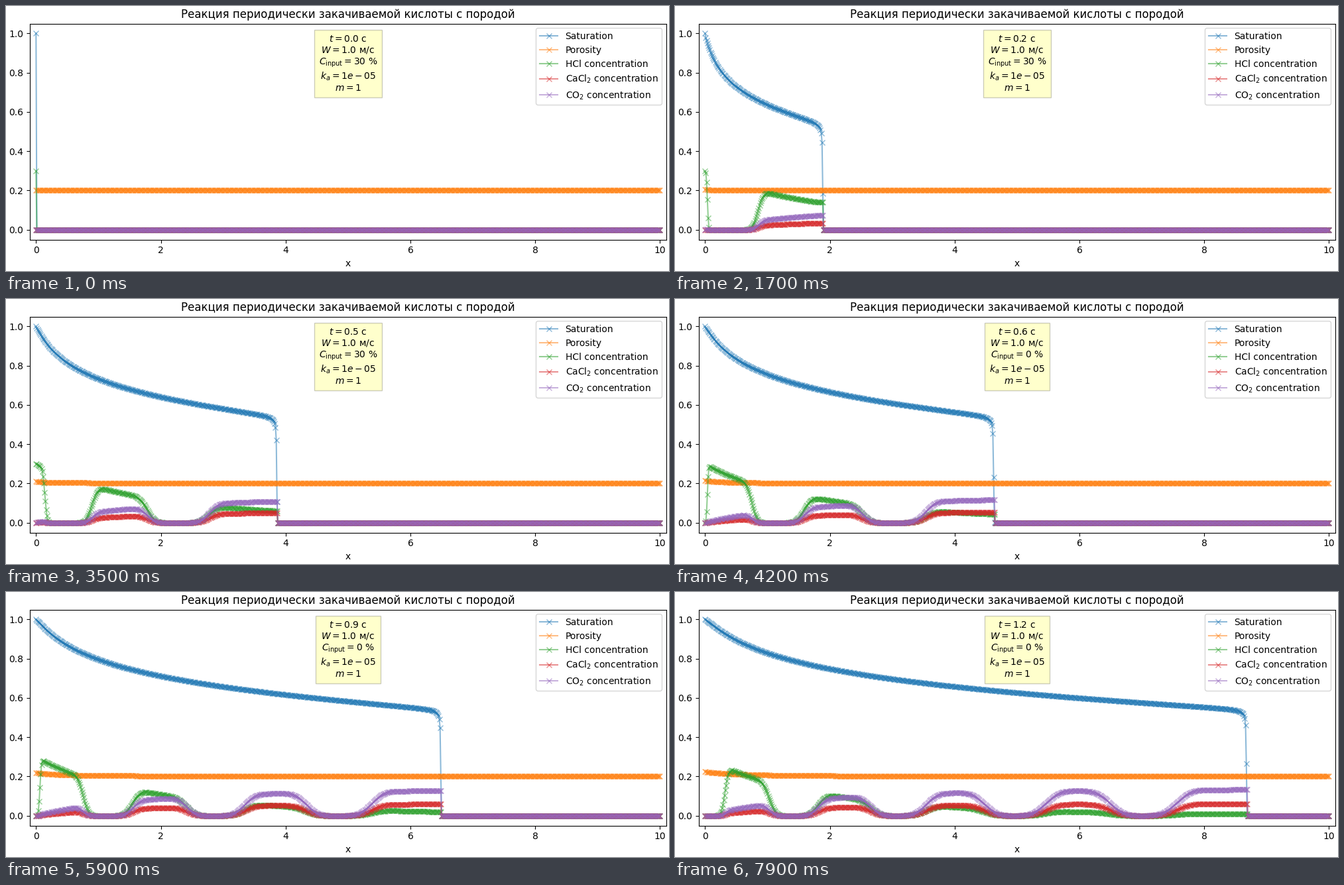
These frames come from a looping animation (1000x400 px, 8000 ms). A matplotlib script:

```python
import numpy as np
import matplotlib.pyplot as plt
from matplotlib.animation import FuncAnimation

FRAMES, STEPS = 80, 12       # frames per loop, solver steps per frame
HALF_PERIOD = 100            # solver steps between switching the acid on and off
DT = 0.01466 / STEPS
W, PHI0, C_IN = 1.0, 0.2, 0.3
LAM = 0.4935                 # cells crossed per step at unit flow
DECAY, GROWTH = 3.15, 0.137  # acid consumption and pore growth rates
CACL2, CO2 = 0.21, 0.454     # product yields per unit of spent acid

x = np.linspace(0, 10, 801)


def flow(s):
    """Fractional flow of the acid solution."""
    wet = s ** 3
    return wet / (wet + 0.149 * (1 - s) ** 1.7)


def inlet(step):
    return C_IN if step // HALF_PERIOD % 2 == 0 else 0.0


def upwind(q, flux, lam=LAM):
    q[..., 1:] += lam * (flux[..., :-1] - flux[..., 1:])


def move_water(s, parts=2):
    """Advance saturation by one step and return the mean flow."""
    total = np.zeros_like(s)
    for _ in range(parts):
        f = flow(s)
        upwind(s, f, LAM / parts)
        np.clip(s, 0, 1, out=s)
        total += f / parts
    return total


def simulate():
    s = np.zeros_like(x)
    s[0] = 1
    phi = np.full_like(x, PHI0)
    conc = np.zeros((2, x.size))   # remaining acid, injected acid
    conc[:, 0] = C_IN
    mass = s * conc
    states = []
    for step in range(FRAMES * STEPS):
        if step % STEPS == 0:
            acid, spent = conc[0], conc[1] - conc[0]
            states.append((s.copy(), phi.copy(), acid.copy(),
                           CACL2 * spent, CO2 * spent))
        conc[:, 0] = inlet(step + 1)
        upwind(mass, move_water(s) * conc)
        mass[0, 1:] *= 1 - DECAY * DT
        conc[:, 1:] = np.where(s > 1e-3, mass / np.maximum(s, 1e-3), 0)[:, 1:]
        phi += GROWTH * DT * conc[0] * s ** 2
    return states


def caption(n):
    percent = 100 * inlet(n * STEPS)
    return "\n".join([
        f"$t = {n * STEPS * DT:.1f}$ с",
        f"$W = {W}$ м/с",
        rf"$C_\mathrm{{input}} = {percent:.0f}$ %",
        "$k_a = 1e-05$",
        "$m = 1$",
    ])


states = simulate()

plt.rcParams["font.family"] = "DejaVu Sans"
fig, ax = plt.subplots(figsize=(10, 4), dpi=100, layout="constrained")
ax.set(xlim=(-0.1, 10.1), ylim=(-0.05, 1.05), xlabel="x",
       title="Реакция периодически закачиваемой кислоты с породой")

labels = ["Saturation", "Porosity", "HCl concentration",
          "CaCl$_2$ concentration", "CO$_2$ concentration"]
lines = [ax.plot(x, y, marker="x", alpha=0.5, label=label)[0]
         for y, label in zip(states[0], labels)]
ax.legend(loc="upper right")
info = ax.text(0.5, 0.95, caption(0), ha="center", va="top",
               transform=ax.transAxes,
               bbox=dict(facecolor="yellow", alpha=0.2, pad=5))

# Settle the layout once so that later draws stay fast.
fig.draw_without_rendering()
fig.set_layout_engine("none")


def update(n):
    for line, y in zip(lines, states[n]):
        line.set_ydata(y)
    info.set_text(caption(n))
    return [*lines, info]


anim = FuncAnimation(fig, update, frames=FRAMES, interval=100, repeat=True)
plt.show()
```
